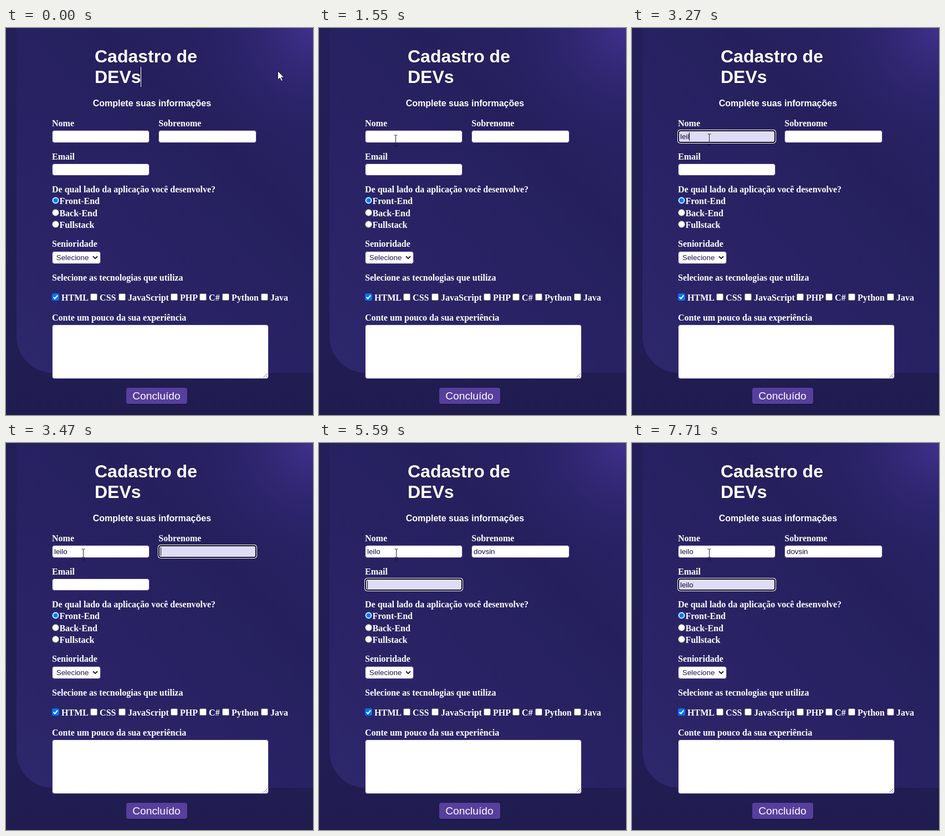
An HTML page that plays this animation: 554x697 px, repeating every 8 s.

```html
<!DOCTYPE html>
<html lang="pt-BR">
<head>
<meta charset="utf-8">
<title>Cadastro de DEVs</title>
<style>
  html, body { margin: 0; width: 100%; height: 100%; overflow: hidden; background: #221d53; }
  svg { display: block; width: 554px; height: 697px; }
  text { white-space: pre; fill: #fff; }
  .title { font: bold 32px "Liberation Sans", Arial, sans-serif; }
  .sub { font: bold 16px "Liberation Sans", Arial, sans-serif; }
  .label { font: bold 16px "Liberation Serif", "Times New Roman", serif; }
  .value { font: 13.333px "Liberation Sans", Arial, sans-serif; fill: #110c38; }
  .button { font: 19.2px "Liberation Sans", Arial, sans-serif; }
  .box { fill: #fff; stroke: #4d3795; }
  .toggle { fill: #fff; stroke: #767676; }
</style>
</head>
<body>
<svg id="stage" viewBox="0 0 554 697" xmlns="http://www.w3.org/2000/svg">
  <defs>
    <linearGradient id="panel" gradientUnits="userSpaceOnUse" x1="30" y1="600" x2="470" y2="160">
      <stop offset="0" stop-color="#2d276b"/>
      <stop offset=".45" stop-color="#292365"/>
      <stop offset=".85" stop-color="#25205d"/>
      <stop offset="1" stop-color="#272161"/>
    </linearGradient>
    <radialGradient id="glow" gradientUnits="userSpaceOnUse" cx="554" cy="0" r="230">
      <stop offset="0" stop-color="#40318c"/>
      <stop offset=".45" stop-color="#34297a" stop-opacity=".6"/>
      <stop offset="1" stop-color="#2a2368" stop-opacity="0"/>
    </radialGradient>
    <linearGradient id="page" x1="0" y1="0" x2="0" y2="1">
      <stop offset="0" stop-color="#241f59"/>
      <stop offset="1" stop-color="#211c50"/>
    </linearGradient>
  </defs>
  <rect width="554" height="697" fill="url(#page)"/>
  <rect x="19" y="-80" width="700" height="701" rx="65" fill="url(#panel)"/>
  <rect x="300" width="254" height="240" fill="url(#glow)"/>
</svg>
<script>
const stage = document.getElementById('stage');

function add(tag, attrs, content = '') {
  const el = document.createElementNS('http://www.w3.org/2000/svg', tag);
  for (const key in attrs) el.setAttribute(key, attrs[key]);
  el.textContent = content;
  return stage.appendChild(el);
}
const write = (cls, x, y, content) => add('text', { class: cls, x, y }, content);
const box = (x, y, width, height, rx = 4) =>
  add('rect', { class: 'box', x: x + .5, y: y + .5, width: width - 1, height: height - 1, rx });
const show = (el, on) => el.setAttribute('visibility', on ? 'visible' : 'hidden');

write('title', 160, 62, 'Cadastro de');
write('title', 160, 99, 'DEVs');
write('sub', 156.7, 140.5, 'Complete suas informações');
[
  [83, 177, 'Nome'], [275.3, 177, 'Sobrenome'], [83, 237, 'Email'],
  [83, 296, 'De qual lado da aplicação você desenvolve?'],
  [83, 394, 'Senioridade'], [83, 455, 'Selecione as tecnologias que utiliza'],
  [83, 527, 'Conte um pouco da sua experiência']
].forEach(label => write('label', ...label));

// Radio buttons
[[310.5, 'Front-End'], [332.5, 'Back-End'], [353.5, 'Fullstack']].forEach(([cy, name], i) => {
  const dot = add('circle', { class: 'toggle', cx: 89.5, cy, r: 6 });
  if (i === 0) {
    dot.style.stroke = '#0075ff';
    add('circle', { cx: 89.5, cy, r: 4, fill: '#0075ff' });
  }
  write('label', 96.4, cy + 6.5, name);
});

// Checkboxes
[[83, 'HTML'], [152, 'CSS'], [203, 'JavaScript'], [297, 'PHP'], [349, 'C#'], [390, 'Python'], [460, 'Java']]
  .forEach(([x, name], i) => {
    const square = add('rect', { class: 'toggle', x: x + .5, y: 478.5, width: 12, height: 12, rx: 2 });
    if (i === 0) {
      square.style.fill = square.style.stroke = '#0075ff';
      add('path', { d: 'M85.6 484.8l2.6 2.7 5-6', fill: 'none', stroke: '#fff', 'stroke-width': 2 });
    }
    write('label', x + 17.1, 491, name);
  });

// Select, text area and button
box(83, 402, 88, 23);
write('value', 90.8, 418, 'Selecione').style.fill = '#1c1750';
add('path', { d: 'M157 411.2l4 4 4-4', fill: 'none', stroke: '#1c1750', 'stroke-width': 2 });
box(83, 534, 391, 98);
add('path', { d: 'M464.5 629.5l7-7M468.5 629.5l3-3', fill: 'none', stroke: '#777' });
add('rect', { x: 218, y: 650, width: 110, height: 29, rx: 4, fill: '#17133c', opacity: .75 });
add('rect', { x: 217, y: 648, width: 110, height: 29, rx: 4, fill: '#563f9d' });
write('button', 228.2, 669, 'Concluído');

// Text fields with their focused look
const fields = [
  [83, 184, 176, 23, 'leilo'], [275, 184, 177, 23, 'dovsin'], [83, 244, 176, 22, 'leilo']
].map(([x, y, w, h, value]) => {
  box(x, y, w, h);
  const ring = add('rect', { x: x - 1, y: y - 1, width: w + 2, height: h + 2, rx: 5, fill: '#fff' });
  const fill = add('rect', { x: x + 1, y: y + 1, width: w - 2, height: h - 2, rx: 3.5,
    fill: '#dfdcf7', stroke: '#0c0a1c', 'stroke-width': 2 });
  return { x: x + 4, y: y + 4, value, focus: [ring, fill], text: write('value', x + 4, y + 16, '') };
});

const titleCaret = add('rect', { x: 243, y: 70, width: 1, height: 36, fill: '#fff' });
const caret = add('rect', { width: 1, height: 15, fill: '#000' });
const arrow = add('path', {
  d: 'M.5.5V16.5L4.2 13l2.6 5.6 2.6-1.1L6.9 12H11.6Z',
  fill: '#fff', stroke: '#111', 'stroke-width': .9
});
const beam = add('path', {
  d: 'M-3-7.5h2.5l.5.5.5-.5H3M0-7V7M-3 7.5h2.5L0 7l.5.5H3',
  fill: 'none', stroke: '#25222f'
});
const beamShade = add('path', { d: 'M-3 11h6M-1 13h3', stroke: '#15122f', opacity: .5, 'stroke-width': 2 });

// [time, focused field (-1 is the title), typed letters, caret on]
const typing = [
  [0, -1, 0, 1], [460, -1, 0, 0], [990, -1, 0, 1], [1480, -1, 0, 0],
  [1650, 0, 0, 1], [2150, 0, 0, 0], [2550, 0, 1, 1], [2750, 0, 2, 1],
  [3010, 0, 3, 1], [3270, 0, 4, 1], [3340, 0, 5, 1],
  [3470, 1, 0, 1], [4000, 1, 0, 0], [4400, 1, 1, 1], [4530, 1, 2, 1],
  [4730, 1, 3, 1], [4860, 1, 4, 1], [4990, 1, 5, 1], [5190, 1, 6, 1],
  [5590, 2, 0, 1], [6120, 2, 0, 0], [6380, 2, 1, 1], [6510, 2, 2, 1],
  [6780, 2, 3, 1], [7110, 2, 4, 1], [7180, 2, 5, 1], [7710, 2, 5, 0]
];

function pointerAt(t) {
  if (t >= 1650) return [139.5, 198.5];
  if (t >= 1480) return [138.5, 200.5];
  const step = t < 660 ? 0 : Math.min(10, Math.floor((t - 660) / 83.3) + 1);
  const p = (1 - Math.cos(Math.PI * step / 10)) / 2;
  return [490 - 351.5 * p, 77 + 125 * p];
}

function draw(t) {
  const [, focus, typed, caretOn] = typing.findLast(step => step[0] <= t);
  fields.forEach((field, i) => {
    field.focus.forEach(el => show(el, i === focus));
    field.text.textContent = i < focus ? field.value : i === focus ? field.value.slice(0, typed) : '';
  });
  show(titleCaret, focus < 0 && caretOn);
  show(caret, focus >= 0 && caretOn);
  if (focus >= 0) {
    const { x, y, text } = fields[focus];
    caret.setAttribute('x', Math.floor(x + text.getComputedTextLength()));
    caret.setAttribute('y', y);
  }
  const [px, py] = pointerAt(t);
  const overField = px < 259 && py > 184;
  show(arrow, !overField);
  show(beam, overField);
  show(beamShade, overField);
  for (const el of [arrow, beam, beamShade]) el.setAttribute('transform', `translate(${px} ${py})`);
}

const start = performance.now();
function tick() {
  draw((performance.now() - start) % 8000);
  requestAnimationFrame(tick);
}
tick();
</script>
</body>
</html>
```
